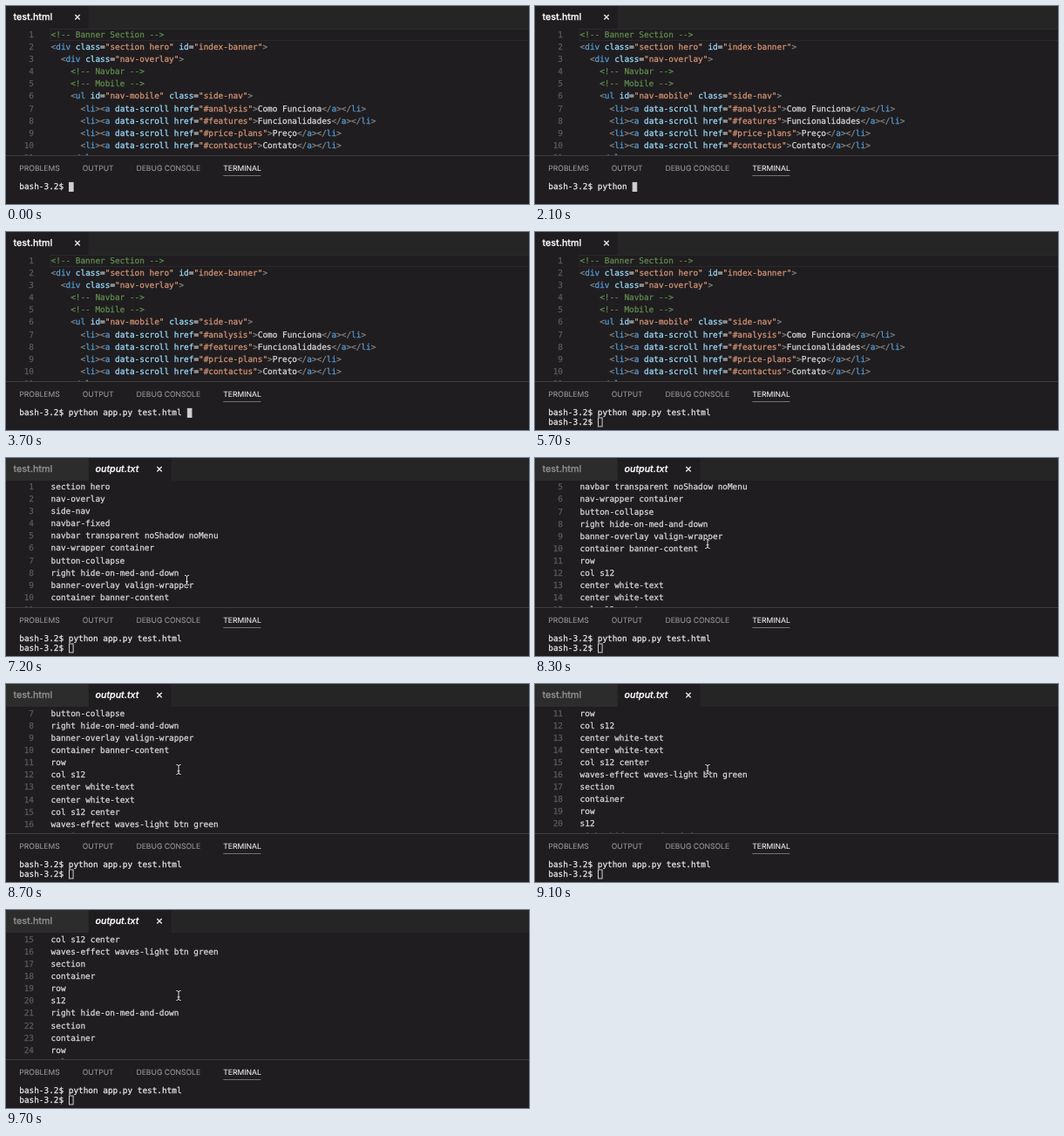
These frames come from a looping animation (600x227 px, 9.8 s). An HTML page:

```html
<!DOCTYPE html>
<html lang="en">
<head>
<meta charset="utf-8">
<title>Terminal demo</title>
<style>
  html, body { margin: 0; width: 100%; height: 100%; overflow: hidden; background: #1f1d1f; }
  svg { display: block; }
  text { white-space: pre; text-rendering: geometricPrecision; }
  text, tspan { fill: currentColor; stroke: currentColor; stroke-width: .25px; }
  .code, .term { font: 9.4px "DejaVu Sans Mono", monospace; }
  .code { color: #dadada; }
  .num { color: #5c5b5c; text-anchor: end; }
  .term { color: #e8e8e8; }
  .tab { font: 500 10.7px Inter, sans-serif; color: #fff; }
  .italic { font-style: italic; }
  .dim { color: #8f8e8f; }
  .title { font: 8.6px Inter, sans-serif; color: #979697; stroke-width: .1px; }
  .current { color: #f0f0f0; }
  .comment { color: #608b4e; }
  .bracket { color: #808080; }
  .tag { color: #569cd6; }
  .attr { color: #9cdcfe; }
  .string { color: #d49478; }
</style>
</head>
<body>
<svg width="600" height="227" viewBox="0 0 600 227">
  <defs>
    <path id="beam" fill="none" d="M-2.6 -5.5 Q0 -5.5 0 -4 Q0 -5.5 2.6 -5.5 M0 -4 V4 M-2.6 5.5 Q0 5.5 0 4 Q0 5.5 2.6 5.5 M-1.5 1.8 H1.5"/>
  </defs>
  <rect width="600" height="227" fill="#1f1d1f"/>
  <g id="html">
    <rect x="51" y="26.5" width="560" height="13" fill="none" stroke="#2b2a2b"/>
  </g>
  <g id="output"></g>

  <rect width="600" height="26" fill="#262526"/>
  <rect id="activeTab" width="94.5" height="26" fill="#1f1d1f"/>
  <rect id="idleTab" width="94.5" height="26" fill="#2d2c2d"/>
  <text id="firstName" class="tab" x="8.5" y="16.2">test.html</text>
  <text id="secondName" class="tab italic" x="102.5" y="16.2">output.txt</text>
  <path id="close" d="M-2.7 -2.7 L2.7 2.7 M2.7 -2.7 L-2.7 2.7" stroke="#e8e8e8" stroke-width="1.4"/>

  <rect y="171" width="600" height="56" fill="#1f1d1f"/>
  <rect y="171" width="600" height="1" fill="#403f40"/>
  <text class="title" x="15.3" y="189.2">PROBLEMS</text>
  <text class="title" x="87.7" y="189.2">OUTPUT</text>
  <text class="title" x="149.5" y="189.2">DEBUG CONSOLE</text>
  <text class="title current" x="249.3" y="189.2">TERMINAL</text>
  <rect x="249.3" y="194" width="43" height="1" fill="#747374"/>
  <text id="line1" class="term" x="15.3" y="210.2"></text>
  <text id="line2" class="term" x="15.3" y="221.2"></text>
  <rect id="caret" width="4.6" height="10" stroke="#d0d0d0"/>

  <g id="mouse">
    <use href="#beam" stroke="#111" stroke-width="2.4"/>
    <use href="#beam" stroke="#e8e8e8"/>
  </g>
</svg>
<script>
const LOOP = 9800, STEP = 100, ROW = 14.1, CHAR = 5.66;
const PROMPT = 'bash-3.2$ ', COMMAND = 'python app.py test.html ';
const $ = id => document.getElementById(id);

const link = (href, label) => `      <li><a data-scroll href="#${href}">${label}</a></li>`;
const markup = [
  '<!-- Banner Section -->',
  '<div class="section hero" id="index-banner">',
  '  <div class="nav-overlay">',
  '    <!-- Navbar -->',
  '    <!-- Mobile -->',
  '    <ul id="nav-mobile" class="side-nav">',
  link('analysis', 'Como Funciona'),
  link('features', 'Funcionalidades'),
  link('price-plans', 'Preço'),
  link('contactus', 'Contato'),
  '    </ul>'
];
const classes = `section hero
nav-overlay
side-nav
navbar-fixed
navbar transparent noShadow noMenu
nav-wrapper container
button-collapse
right hide-on-med-and-down
banner-overlay valign-wrapper
container banner-content
row
col s12
center white-text
center white-text
col s12 center
waves-effect waves-light btn green
section
container
row
s12
right hide-on-med-and-down
section
container
row
col s12`.split('\n');

const TOKEN = /(?<comment><!--.*?-->)|(?<bracket><\/?|\/?>)|(?<tag>(?<=<\/?)\w+)|(?<attr>[\w-]+(?=[ =][^<]*>))|(?<string>"[^"]*")|(?<plain>\s+|=|[^<>"=\s]+)/g;

function add(parent, name, attrs, text) {
  const el = document.createElementNS('http://www.w3.org/2000/svg', name);
  for (const key in attrs) el.setAttribute(key, attrs[key]);
  if (text) el.textContent = text;
  parent.append(el);
  return el;
}

function addRows(parent, rows) {
  rows.forEach((row, i) => {
    const y = 35.9 + i * ROW;
    add(parent, 'text', { class: 'code num', x: 32, y }, String(i + 1));
    const line = add(parent, 'text', { class: 'code', x: 51.6, y });
    for (const { 0: part, groups } of row.matchAll(TOKEN)) {
      const kind = Object.keys(groups).find(key => groups[key] !== undefined);
      add(line, 'tspan', { class: kind }, part);
    }
  });
}
addRows($('html'), markup);
addRows($('output'), classes);

// Linear interpolation through [time, value] points.
function track(points, t) {
  if (t <= points[0][0]) return points[0][1];
  for (let i = 1; i < points.length; i++) {
    const [t0, a] = points[i - 1], [t1, b] = points[i];
    if (t <= t1) return a + (b - a) * (t - t0) / (t1 - t0);
  }
  return points[points.length - 1][1];
}

const typed = [[900, 0], [2000, 7], [2200, 7], [3600, 24]];
const scroll = [[7700, 0], [7800, 5], [8000, 32.3], [8200, 52], [8300, 56], [8400, 56],
  [8500, 63], [8700, 83.6], [9000, 126], [9300, 169], [9400, 169], [9600, 191], [9700, 196.4]];
const mouseX = [[7000, 217], [7400, 198]];
const mouseY = [[7000, 222], [7200, 140], [7400, 98]];

const show = (id, on) => $(id).setAttribute('visibility', on ? 'visible' : 'hidden');
const move = (id, x, y) => $(id).setAttribute('transform', `translate(${x} ${y})`);

function draw(t) {
  const opened = t >= 5800, entered = t >= 3900, blurred = t >= 5300;
  const count = Math.floor(track(typed, t) + 1e-6);
  const second = t >= 4000 ? PROMPT : '';

  show('html', !opened);
  show('output', opened);
  show('idleTab', opened);
  show('secondName', opened);
  move('activeTab', opened ? 95 : 0, 0);
  move('close', opened ? 176 : 82, 12.8);
  $('firstName').classList.toggle('dim', opened);
  move('output', 0, -track(scroll, t));

  $('line1').textContent = PROMPT + COMMAND.slice(0, count);
  $('line2').textContent = second;
  const column = entered ? second.length : PROMPT.length + count;
  move('caret', 15.9 + column * CHAR, entered ? 213 : 202.4);
  $('caret').setAttribute('fill', blurred ? 'none' : '#d0d0d0');

  show('mouse', t >= 7000);
  move('mouse', track(mouseX, t), track(mouseY, t));
}

const start = performance.now();
function tick() {
  const t = (performance.now() - start) % LOOP;
  draw(Math.floor(t / STEP) * STEP);
  requestAnimationFrame(tick);
}
tick();
</script>
</body>
</html>
```
